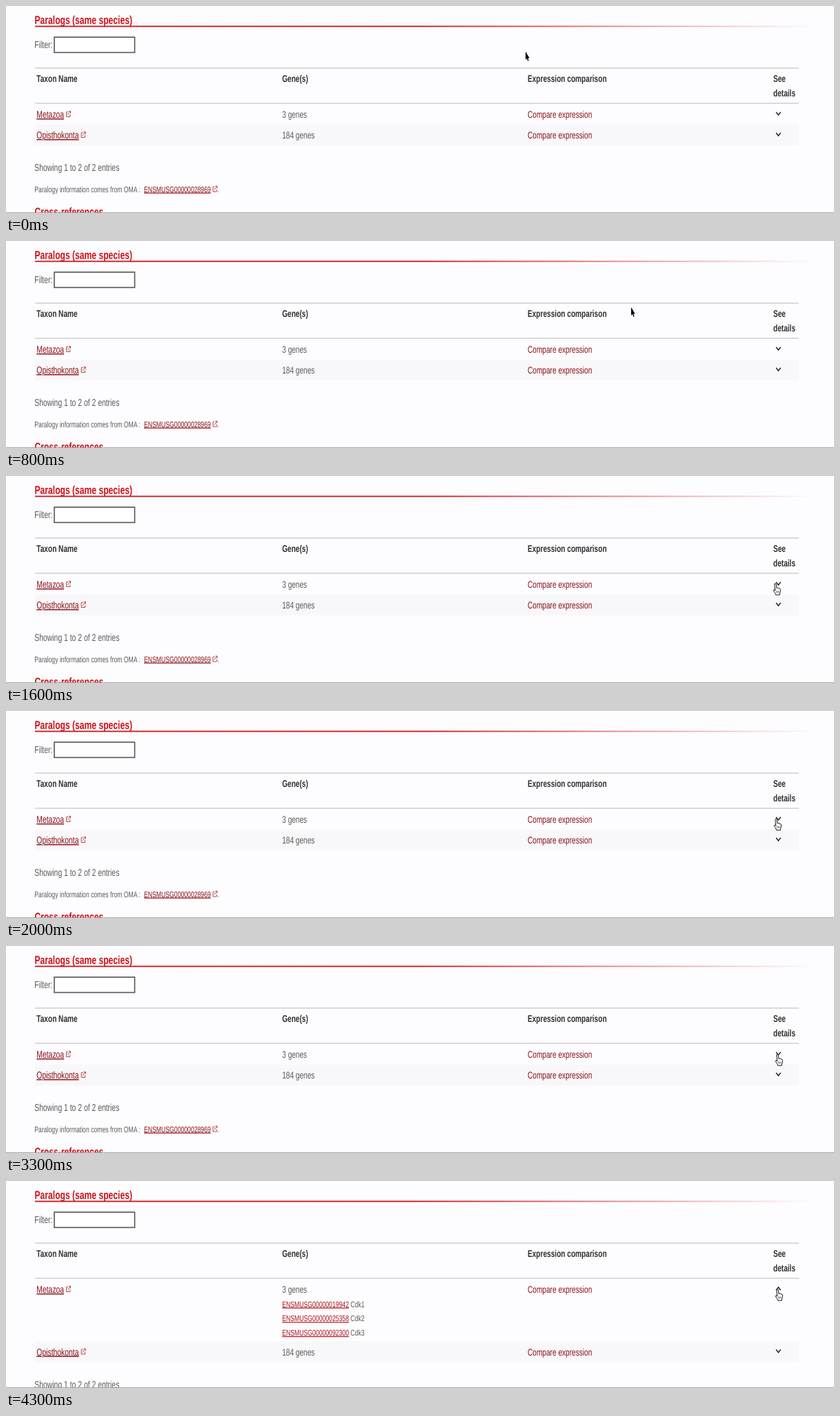
Recreate the animation shown at these times as an HTML page. Size 1200x300 px, loop 4400 ms.

```html
<!DOCTYPE html>
<html lang="en">
<head>
<meta charset="utf-8">
<title>Paralogs</title>
<style>
  html, body { margin: 0; width: 100%; height: 100%; overflow: hidden; background: #fdfcfe; }
  svg { display: block; width: 1200px; height: 300px; }
  text { font-family: "Liberation Sans", Arial, sans-serif; fill: #5a5a5a; text-rendering: geometricPrecision; }
  .head { font-weight: bold; fill: #303030; }
  .title { font-weight: bold; fill: #cd1218; }
  .link { fill: #8a1118; }
  .url { fill: #8a1118; text-decoration: underline 1px; }
  .gene { fill: #ad141b; text-decoration: underline 1px; }
  .icon { fill: none; stroke: #a8383c; stroke-width: .9; }
  .chevron { fill: none; stroke: #222; stroke-width: 1.4; }
</style>
</head>
<body>
<svg id="stage" viewBox="0 0 1200 300">
  <defs>
    <linearGradient id="fade" gradientUnits="userSpaceOnUse" x1="42" x2="1170">
      <stop offset=".5" stop-color="#cd1218"/>
      <stop offset="1" stop-color="#cd1218" stop-opacity="0"/>
    </linearGradient>
  </defs>
  <rect width="1200" height="300" fill="#fdfcfe"/>
  <rect x="42" y="28.6" width="1128" height="1.8" fill="url(#fade)"/>
  <rect x="70" y="45.2" width="116.5" height="22.2" fill="#fff" stroke="#555" stroke-width="1.6"/>
  <path d="M42 90H1149M42 141H1149" stroke="#d0cfd1" stroke-width="1.7"/>
  <g id="fixed"></g>
  <g id="genes"></g>
  <g id="below"><rect x="42" y="172" width="1107" height="30" fill="#f8f7f9"/></g>
  <rect y="299" width="1200" height="1" fill="#a5a4a6"/>
  <g id="cursor">
    <path id="arrow" d="M0 0V12L1.9 9.9L3.3 13.8L4.7 13.2L3.3 9.4H5.7Z"
      fill="#000" stroke="#fff" stroke-width=".8" paint-order="stroke"/>
    <g id="hand" stroke="#111" stroke-width="1" stroke-linejoin="round">
      <path fill="#fff" d="M-1.2 1C-1.2-.8 1-.8 1.2 1L2 6.5C2.4 5.4 4 5.6 4.1 7C4.7 6 6 6.3 6 7.6C6.6 7 7.6 7.4 7.5 8.6C7.6 12 6.5 13 6.2 16.2H.6C.3 14-1.6 12.5-2.6 10C-3 8.6-1.5 8.2-.2 10.2Z"/>
      <path d="M1.6 10.5V13.5M3.3 10.5V13.5M5 10.5V13.5" stroke-width=".6"/>
    </g>
  </g>
</svg>
<script>
const NS = 'http://www.w3.org/2000/svg';
const SQUEEZE = 0.722;  // the whole page is shown narrowed by this factor
const LOOP = 4400, STEP = 100, OPEN_AT = 3400, ROW_SHIFT = 60.5;
const $ = id => document.getElementById(id);

function add(parent, tag, attrs, content = '') {
  const node = document.createElementNS(NS, tag);
  for (const key in attrs) node.setAttribute(key, attrs[key]);
  node.textContent = content;
  return parent.appendChild(node);
}
const label = (parent, x, y, content, cls = '', size = 14) =>
  add(parent, 'text', {
    class: cls, 'font-size': size,
    transform: `translate(${x} ${y}) scale(${SQUEEZE} 1)`
  }, content);
const externalIcon = (parent, x, y) =>
  add(parent, 'path', {
    class: 'icon', transform: `translate(${x} ${y})`,
    d: 'M3 1.5H.5V8.5H5.8V5.2M2.3 5.9L6.4.6M3.9.5H6.5V3.7'
  });
const chevron = (parent, y) =>
  add(parent, 'path', { class: 'chevron', d: 'M-3.3-2.2L0 2L3.3-2.2', transform: `translate(1119.4 ${y})` });

const fixed = $('fixed'), genes = $('genes'), below = $('below');

label(fixed, 41.5, 25.6, 'Paralogs (same species)', 'title', 16.8);
label(fixed, 41.3, 61, 'Filter:', '', 14.4);
[[44.3, 110, 'Taxon Name'], [400.2, 110, 'Gene(s)'], [756, 110, 'Expression comparison'],
 [1112, 110, 'See'], [1112, 131, 'details']]
  .forEach(([x, y, content]) => label(fixed, x, y, content, 'head'));

function taxonRow(parent, y, name, iconX, count) {
  label(parent, 44.3, y, name, 'url', 14.4);
  externalIcon(parent, iconX, y - 10);
  label(parent, 400.2, y, count);
  label(parent, 756, y, 'Compare expression', 'link');
  return chevron(parent, y - 6);
}
const toggle = taxonRow(fixed, 162, 'Metazoa', 87, '3 genes');
taxonRow(below, 192, 'Opisthokonta', 108.7, '184 genes');

['19942', '25358', '92300'].forEach((id, i) => {
  const y = 182.5 + i * 20.7;
  label(genes, 400.2, y, 'ENSMUSG000000' + id, 'gene', 12);
  label(genes, 499.3, y, 'Cdk' + (i + 1), '', 12);
});

label(below, 41.3, 239, 'Showing 1 to 2 of 2 entries', '', 14.4);
label(below, 41.3, 269.5, 'Paralogy information comes from OMA :', '', 12);
label(below, 200, 269.5, 'ENSMUSG00000028969', 'url', 12);
externalIcon(below, 299.5, 260.5);
label(below, 306.3, 269.5, '.', '', 12);
label(below, 41.5, 304.3, 'Cross-references', 'title', 16.8);

// [time, x, y] of the pointer tip
const PATH = [
  [0, 753, 66], [400, 753, 66], [500, 765, 67], [600, 802, 72], [700, 854, 83],
  [800, 906, 96], [1000, 1000, 121], [1200, 1067, 141], [1300, 1092, 149],
  [1400, 1107, 154], [1600, 1115, 156], [2000, 1116, 156.5], [2300, 1118, 157],
  [LOOP, 1118, 157]
];
const HAND_AT = 1500;

function pointerAt(t) {
  const next = PATH.findIndex(p => p[0] > t);
  const [t0, x0, y0] = PATH[next - 1], [t1, x1, y1] = PATH[next];
  const k = (t - t0) / (t1 - t0);
  return [x0 + (x1 - x0) * k, y0 + (y1 - y0) * k];
}

const show = (node, on) => node.setAttribute('visibility', on ? 'visible' : 'hidden');

function draw(time) {
  const t = Math.floor((time % LOOP) / STEP) * STEP;
  const open = t >= OPEN_AT, hand = t >= HAND_AT;
  const turn = Math.min(180, Math.max(0, 45 + (t - OPEN_AT) * 0.75));
  show(genes, open);
  below.setAttribute('transform', `translate(0 ${open ? ROW_SHIFT : 0})`);
  toggle.setAttribute('transform', `translate(1119.4 156) rotate(${open ? turn : 0})`);
  show($('arrow'), !hand);
  show($('hand'), hand);
  $('cursor').setAttribute('transform', `translate(${pointerAt(t)})`);
}

const start = performance.now();
function tick() {
  draw(performance.now() - start);
  requestAnimationFrame(tick);
}
tick();
</script>
</body>
</html>
```
